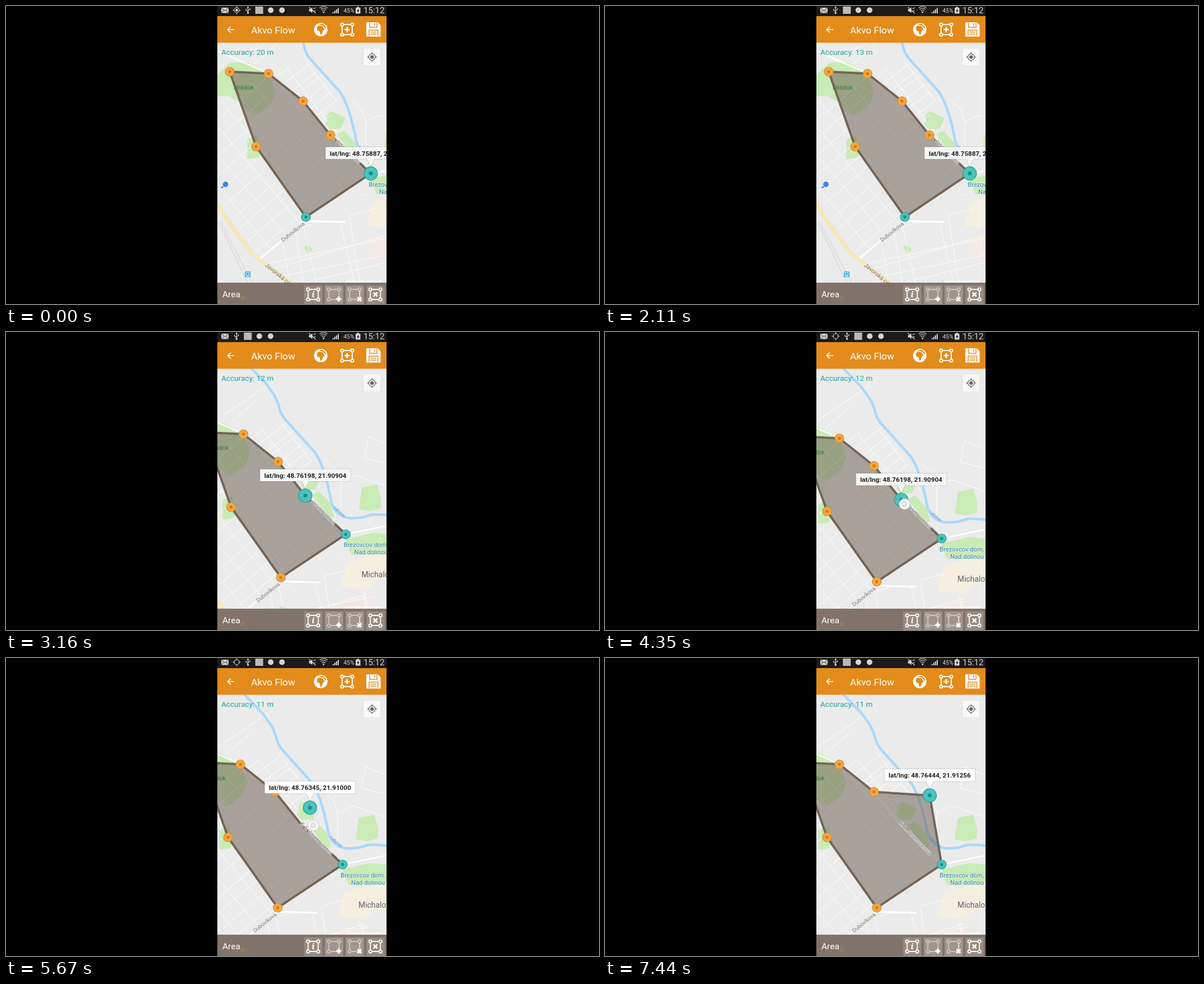
Recreate the animation shown at these times as an HTML page. Size 1055 px wide and 531 px high, loop 8 s.

```html
<!DOCTYPE html>
<html lang="en">
<head>
<meta charset="utf-8">
<title>Area map</title>
<style>
  html, body { margin: 0; width: 100%; height: 100%; overflow: hidden; background: #000; }
  svg { display: block; width: 100%; height: 100%; font-family: Roboto, "Noto Sans", sans-serif; }
  .park { fill: #c9ebb5; stroke: #c9ebb5; stroke-width: 3; stroke-linejoin: round; }
  .line { fill: none; stroke: #fff; stroke-linejoin: round; stroke-linecap: round; }
  .halo text { paint-order: stroke; stroke: #efeeed; stroke-width: 1.6px; stroke-linejoin: round; }
  .status { fill: #d5d5d5; }
  .status .thin { fill: none; stroke: #d5d5d5; stroke-width: 1.2; }
</style>
</head>
<body>
<svg viewBox="0 0 1055 531">
  <defs>
    <clipPath id="phone"><rect x="376" width="301" height="531"/></clipPath>
    <clipPath id="town"><path d="M326 240L417 192L478 239L597 368L483 448L402 519L326 405Z"/></clipPath>
    <clipPath id="hill"><path d="M425 190L490 165L540 235L520 285Z"/></clipPath>
    <clipPath id="south"><path d="M410 522L483 453L553 454L590 400L630 470L690 500V565H440Z"/></clipPath>
    <g id="frame">
      <path d="M-6 -9H6M-6 9H6M-9 -6V6M9 -6V6"/>
      <circle cx="-9" cy="-9" r="2.6"/><circle cx="9" cy="-9" r="2.6"/>
      <circle cx="-9" cy="9" r="2.6"/><circle cx="9" cy="9" r="2.6"/>
    </g>
  </defs>

  <g clip-path="url(#phone)">
    <rect x="376" width="301" height="531" fill="#ebebeb"/>

    <g id="map">
      <path d="M602 419L645 404H690V446L652 452L640 466L590 461Z" fill="#f5efdf"/>
      <path d="M590 484L640 480L660 510L608 524Z" fill="#f4e9e4"/>
      <g class="park">
        <path d="M322 197L350 171L380 171L415 189L428 222L420 243L392 264L362 237L347 228L322 228Z"/>
        <path d="M381 308L395 301L404 329L397 338L381 340Z"/>
        <path d="M521 267L528 258L552 269L545 286L527 287L521 280Z"/>
        <path d="M541 298L551 293L570 313L577 336L569 338Z"/>
        <path d="M629 286L654 281L660 303V320L643 325L624 322Z"/>
        <path d="M600 378L648 367L690 371V393L660 403H610Z"/>
        <path d="M482 499L487 497L494 503L489 508Z"/>
      </g>

      <g class="line">
        <g id="streets"></g>
        <path d="M378 158L470 96M392 172L436 132M677 209L640 194L632 232L677 243M564 236L583 254L590 276L616 263L677 284M590 276V322" opacity=".9"/>
        <path d="M326 149L417 189L478 239L527 299L599 368L690 349" stroke-width="2.4"/>
        <path d="M402 519L483 452L553 454" stroke-width="3"/>
        <path d="M424 65L456 98L469 116Q478 130 480 140Q483 154 492 164L545 223Q558 244 566 277L571 298Q575 335 605 339Q622 341 645 333Q660 332 690 336" stroke="#a9d9fc" stroke-width="4.6"/>
        <g id="highway"></g>
        <path d="M328 454L382 566M332 454L390 566" stroke="#cfcfcf"/>
      </g>

      <polygon id="area" fill="#72645a" fill-opacity=".55" stroke="#746558" stroke-width="4" stroke-linejoin="round"/>

      <g transform="translate(380 547)">
        <rect x="-5" y="-5" width="10" height="10" rx="1.5" fill="#3fa9e0"/>
        <path d="M-2.5 -3H2.5V2H-2.5ZM-2 3.5H2" class="line"/>
      </g>
      <g class="halo">
        <text x="355" y="218" font-size="11.2" fill="#2f7f40" style="stroke:none">Hrádok</text>
        <text transform="translate(443 489.5) rotate(-38.5)" font-size="9.7" fill="#777">Dubovíkova</text>
        <text transform="translate(523 296) rotate(45.5)" font-size="9" fill="#65605d">K. L. Jasenovanova</text>
        <text transform="translate(410 532) rotate(39)" font-size="10.3" fill="#7f6a35">Javorská cesta</text>
        <text transform="translate(577 321) rotate(42)" font-size="7" fill="#4a93c8" style="stroke:none">Laborec</text>
        <g font-size="11.2" fill="#26899a" text-anchor="end">
          <text x="674" y="391">Brezovcov dom,</text>
          <text x="674" y="404">Nad dolinou</text>
        </g>
        <text x="627" y="445" font-size="13.9" fill="#666">Michalovce</text>
      </g>
      <g id="me">
        <path d="M-9 7L-4 1L-3 6Z" fill="#4a80ea"/>
        <circle r="6" fill="#fff"/><circle r="5" fill="#4282f0"/>
      </g>
      <g id="pins"></g>
    </g>

    <text id="acc" x="383" y="86.5" font-size="13.6" fill="#1ba79d"></text>
    <g transform="translate(651.3 91)">
      <rect x="-15.5" y="-15.8" width="31" height="31.5" fill="#f8f8f8" stroke="#000" stroke-opacity=".07"/>
      <circle r="5.8" fill="none" stroke="#666" stroke-width="1.3"/>
      <circle r="3.2" fill="#666"/>
      <path d="M0 -8.5V-6M0 6V8.5M-8.5 0H-6M6 0H8.5" stroke="#666" stroke-width="1.4"/>
    </g>
    <rect x="604" y="488.5" width="63" height="5" fill="#fff" opacity=".5"/>
    <g id="touch">
      <circle r="9.6" fill="#f8f8f8" stroke="#c6c6ca"/>
      <circle r="5.5" fill="#dfdfe1"/><circle r="3" fill="#e9e9ea"/>
    </g>

    <rect x="376" y="18" width="301" height="47.5" fill="#e38b1b"/>
    <g stroke="#fff" fill="none" stroke-width="1.7">
      <path d="M406 42H394.5M400 36.5L394.3 42L400 47.5"/>
      <g transform="translate(607 42)" stroke-width="2">
        <use href="#frame"/><path d="M-4.5 0H4.5M0 -4.5V4.5" stroke-width="2.6"/>
      </g>
    </g>
    <text x="436" y="48.8" font-size="17.2" fill="#fff">Akvo Flow</text>
    <g transform="translate(560 42)">
      <circle r="12" fill="#fff"/>
      <path d="M-7 -4L-4 -7L3 -6L7 0L4 2L2 8L-1 9L-2 3L-6 2ZM-5 -10L4 -10L9 -5L9 -1L4 -7Z" fill="#e38b1b"/>
    </g>
    <g transform="translate(641.5 29.5)">
      <path d="M0 0H20L24.5 4.5V24.5H0Z" fill="#fff" stroke="#fff" stroke-linejoin="round"/>
      <path d="M5.5 0V8.5H18.5V0M4.5 24V13.5H20V24M7 17H17.5M7 20.5H17.5M14.5 1V6" fill="none" stroke="#e38b1b" stroke-width="1.5"/>
    </g>

    <rect x="376" y="493" width="301" height="38" fill="#7f7067" opacity=".97"/>
    <circle cx="421" cy="520" r="4" fill="#b8843c" opacity=".35"/>
    <text x="385" y="519.3" font-size="15.5" fill="#fff">Area</text>
    <g id="tools"></g>

    <rect x="376" width="301" height="18" fill="#1c1a1b"/>
    <g class="status">
      <path d="M383 3H396V12.5H383Z"/>
      <path d="M383.5 3.5L389.5 8.5L395.5 3.5M383.5 12L387.5 8M395.5 12L391.5 8" fill="none" stroke="#1c1a1b"/>
      <g id="gps" transform="translate(410.5 7.5)">
        <path d="M0 -7V-4.5M0 4.5V7M-7 0H-4.5M4.5 0H7" class="thin"/>
        <circle r="4.5" class="thin"/><circle id="fix" r="2.4"/>
      </g>
      <g id="icons">
        <path d="M430.5 2V12M430.5 10L427 7.5V5M430.5 8.5L434 6V4" class="thin"/>
        <circle cx="430.5" cy="12.3" r="1.7"/><path d="M428.5 3.5L430.5 .5L432.5 3.5Z"/>
        <rect x="443.500" y="1" width="14" height="13" fill="#b9b9b9"/>
        <circle cx="471" cy="7.5" r="5"/><circle cx="491" cy="7.5" r="5"/>
      </g>
      <path d="M539 5.5H541.5L545 2.5V12.5L541.5 9.5H539Z"/>
      <path d="M539 2L551 13M547 5L551 3M547 9.5L551 8" class="thin"/>
      <path d="M558 3.5Q565 -2 572 3.5M560 6Q565 2 570 6M562 8.5Q565 6 568 8.5" class="thin"/>
      <path d="M563 10H567L565 13.5Z"/>
      <path id="signal"/>
      <text x="600.5" y="11.8" font-size="10.4">45%</text>
      <path d="M622 3H624.5V1.5H628V3H630.5V13.5H622Z"/>
      <path d="M627.5 4.5L624 9H626L625 12.5L628.8 7.8H626.7Z" fill="#1c1a1b"/>
      <text x="636" y="12.8" font-size="15">15:12</text>
    </g>
  </g>
</svg>

<script>
const $ = id => document.getElementById(id);
const LOOP = 8000, FIRST = 320, STEP = 148.2;

// Step numbers at which things happen.
const LOCATE = 12, TAP = 15, SELECT = 18, PRESS = 27, LIFT = 30, DROP = 45, GPS_OFF = 48;

// Last five digits of latitude and longitude.
const START = [75887, 91404], CORNER = [76198, 90904], END = [76444, 91256];
const CORNERS = [[348, 186], [417, 189.5], [478.5, 238.5], [527, 299], [599, 368], [483.5, 445], [395, 319.5]];

const clamp = p => Math.min(1, Math.max(0, p));
const smooth = p => p * p * (3 - 2 * p);
const move = (el, x, y) => el.setAttribute('transform', `translate(${x} ${y})`);
const show = (el, on) => { el.style.display = on ? '' : 'none'; };
const toMap = ([lat, lng]) => [527 + (lng - CORNER[1]) / 6.95, 299 - (lat - CORNER[0]) / 4.55];

let seed = 7;
const random = () => (seed = seed * 16807 % 2147483647) / 2147483647;

// A street grid turned by deg around a centre; wobble bends it away from straight.
function streets(area, x, y, deg, gapX, gapY, wobble, opacity) {
  const off = () => (random() - .5) * wobble;
  let d = '';
  for (let i = -8; i <= 8; i++) {
    const a = i * gapX, b = i * gapY;
    d += `M${a + off()} -260L${a + off()} 260M-260 ${b + off()}L260 ${b + off()}`;
  }
  return `<g clip-path="url(#${area})"><path opacity="${opacity}"
    transform="translate(${x} ${y}) rotate(${deg})" d="${d}"/></g>`;
}

function tools() {
  const marks = [
    '<text y="5" font-family="Noto Serif, serif" font-size="15" font-style="italic" font-weight="700" text-anchor="middle" fill="#fff" stroke="none">i</text>',
    '<path d="M4 8H13M8.5 3.5V12.5" stroke-width="2.8"/>',
    '<path d="M5 5L12 12M12 5L5 12" stroke-width="2.6"/><path d="M9 -6V5" stroke-dasharray="2 2"/>',
    '<path d="M-3.5 -3.5L3.5 3.5M3.5 -3.5L-3.5 3.5" stroke-width="2.6"/>'
  ];
  return marks.map((mark, i) => {
    const dim = i === 1 || i === 2;
    return `<g transform="translate(${546.5 + i * 36.9} 514)">
      <rect x="-16" y="-16" width="32.5" height="33" fill="#fff" opacity="${dim ? .24 : .17}"/>
      <g fill="none" stroke="#fff" stroke-width="1.8"><use href="#frame" opacity="${dim ? .45 : 1}"/>${mark}</g></g>`;
  }).join('');
}

function build() {
  $('streets').innerHTML = streets('town', 450, 330, -40.5, 33, 25, 6, .7)
    + streets('hill', 480, 220, -38, 38, 16, 8, .8)
    + streets('south', 540, 500, -12, 36, 28, 60, .8);
  $('highway').innerHTML = [['#f0d58c', 5], ['#ffecad', 3.6]].map(([color, width]) =>
    `<path d="M320 409L337 441L387 509L402 521L466 569" stroke="${color}" stroke-width="${width}"/>`).join('');
  $('signal').setAttribute('d', [0, 1, 2, 3].map(i => `M${581 + i * 3} 13v${-2 - i * 2.5}h2V13Z`).join(''));
  $('tools').innerHTML = tools();
}

function pin([x, y], r, teal) {
  const [fill, edge, dot] = teal ? ['#4bc3bc', '#279d96', '#0f938c'] : ['#f3a640', '#d98e30', '#d47d17'];
  return `<g transform="translate(${x} ${y})"><circle r="${r - .5}" fill="${fill}" stroke="${edge}"
    stroke-width="1.2"/><circle r="${1 + r / 5}" fill="${dot}"/></g>`;
}

function bubble([x, y], text, fill) {
  return `<g transform="translate(${x} ${y})">
    <path d="M-80.5 -47H80.5V-25.5H6.5L0 -13L-6.5 -25.5H-80.5Z" fill="${fill}" stroke="#000"
      stroke-opacity=".12" paint-order="stroke" stroke-width="2"/>
    <text y="-31.7" font-size="11.65" font-weight="700" text-anchor="middle" fill="#222">${text}</text></g>`;
}

function dragged(n) {
  const e = smooth(clamp((n - 33.66) / 6.81));
  return [CORNER[0] + 108.7 + 140 * e, CORNER[1] + (END[1] - CORNER[1]) * e].map(Math.round);
}

function draw(t) {
  const n = Math.floor((t - FIRST) / STEP);
  const drag = n >= LIFT && n < DROP;
  const place = n < SELECT ? START : n < LIFT ? CORNER : drag ? dragged(n) : END;
  const spot = toMap(place);
  const chosen = n < SELECT ? 4 : 3;
  const pts = CORNERS.map((p, i) => i === chosen && !drag ? spot : p);

  const left = (1 - clamp((n - SELECT + 1) / 4)) ** 3.2;
  move($('map'), 50 * left, -69 * left);
  move($('me'), 340.5 + 1.25 * ((n >= 0) + (n >= LOCATE)), 386.7);
  $('acc').textContent = `Accuracy: ${n < 0 ? 20 : n < SELECT ? 13 : n < 34 ? 12 : 11} m`;
  $('area').setAttribute('points', pts.join(' '));
  $('pins').innerHTML = pts.map((p, i) => i === chosen ? '' : pin(p, 8.5, i === chosen + 1)).join('')
    + pin(spot, 12.5, true)
    + bubble(spot, `lat/lng: 48.${place[0]}, 21.${place[1]}`, n >= LIFT ? '#fff' : '#f5f5f5');

  const gps = n < LOCATE || n >= PRESS && n < GPS_OFF;
  const beat = (n < PRESS ? n + 6.4 : n - PRESS) % 6.4;
  show($('gps'), gps);
  show($('fix'), beat >= 3);
  move($('icons'), gps ? 0 : -20.3, 0);

  const [x, y] = n < PRESS ? [579, 206.5] : toMap(dragged(n));
  show($('touch'), n === TAP || n >= PRESS && n < DROP);
  move($('touch'), x + 6, y + 31.5);
}

function tick() {
  draw(performance.now() % LOOP);
  requestAnimationFrame(tick);
}

build();
tick();
</script>
</body>
</html>
```
